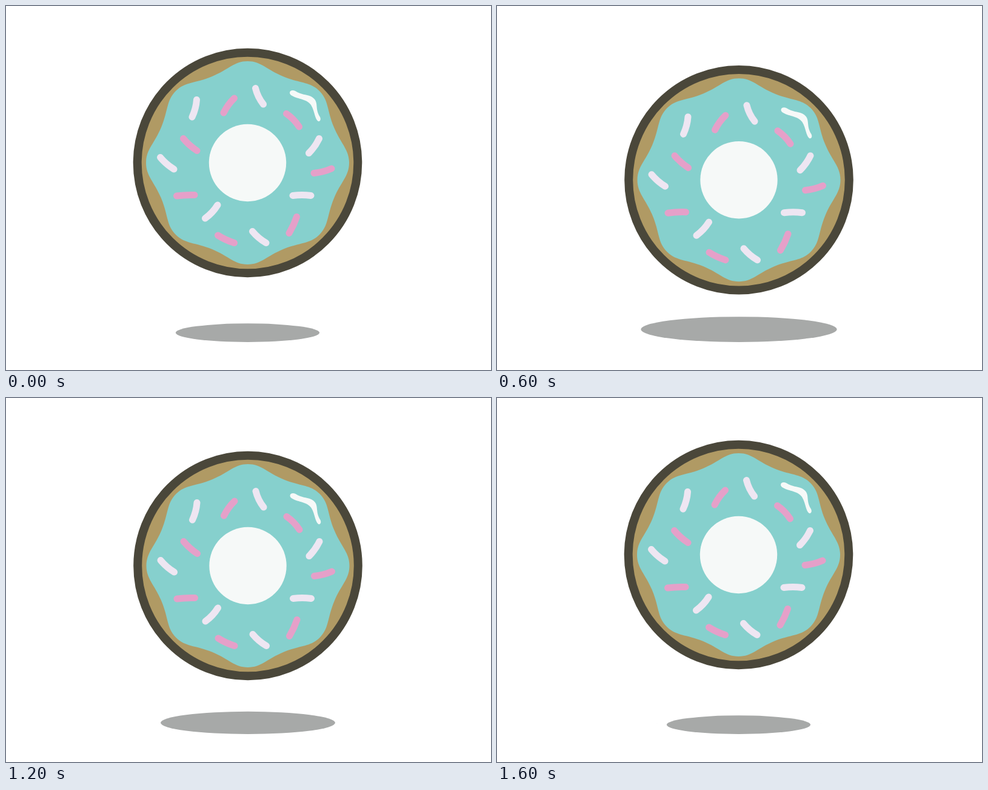
These frames come from a looping animation (800 by 600 pixels, 1.7 s). An HTML page:

```html
<!DOCTYPE html>
<html lang="en">
<head>
<meta charset="utf-8">
<title>Bouncing donut</title>
<style>
  html, body { margin: 0; width: 100%; height: 100%; overflow: hidden; background: #fff; }
  svg { display: block; width: 100%; height: 100%; }
</style>
</head>
<body>
<svg viewBox="0 0 800 600">
  <ellipse id="shadow" fill="#a7a9a8"/>
  <g id="donut">
    <circle cx="398.5" cy="258.5" r="181.8" fill="#b09a64" stroke="#4a473a" stroke-width="14"/>
    <path id="icing" transform="translate(398.5 258.5)" fill="#86d0cd"/>
    <circle cx="398.5" cy="258.5" r="63.7" fill="#f6f9f8"/>
    <g fill="none" stroke-width="11" stroke-linecap="round">
      <path stroke="#eee6f2" d="M314.5 154.5Q313.5 169 307 183M411.5 135.5Q415 150 424.5 162
        M516.5 218.5Q510 232 499.5 242.5M254.5 249.5Q264 261 277 269M473 312.5Q488 310.5 503 312.5
        M349 328Q341 341 328.5 350M406.5 371.5Q416 383 429 390.5"/>
      <path stroke="#e5a0c9" d="M376.5 152Q366 162 359 176M462.5 177.5Q475 186 483.5 199
        M292.5 218.5Q302 230 315 238.5M537 268Q523 274 508 275.5M281.5 313Q296 311 311 311.5
        M349.5 378Q362 386 376.5 390.5M479.5 347.5Q475 361 467 374.5"/>
    </g>
    <path fill="#f6f9f8" d="M468 143C468 139 473 138 477 140C488 147 494 145 503 149C518 157 508 168 518 183
      C520 187 518 191 515 190C509 186 509 172 503 163C496 153 482 154 472 148Q468 146 468 143Z"/>
  </g>
</svg>
<script>
const STEP = 100, STEPS = 17, BOTTOM = 8;
// [step, x shift, y shift, shadow half-width] on the way down
const poses = [[0, 0, 0, 118.6], [3, 0.5, 12, 135], [4, 0.5, 18, 143.9], [6, 0.5, 28.2, 161.7], [8, 3.5, 40.2, 170]];
const donut = document.getElementById('donut');
const shadow = document.getElementById('shadow');

function icingPath() {
  const point = (x, y, angle) => {
    const c = Math.cos(angle), s = Math.sin(angle);
    return `${(x * c - y * s).toFixed(2)} ${(x * s + y * c).toFixed(2)} `;
  };
  const lobe = 167.5, valley = 154, eighth = Math.PI / 4;
  let d = 'M' + point(0, -lobe, 0);
  for (let i = 0; i < 8; i++) {
    const tip = i * eighth, dip = tip + eighth / 2, next = tip + eighth;
    d += 'C' + point(22, -lobe, tip) + point(-30, -valley, dip) + point(0, -valley, dip);
    d += 'C' + point(30, -valley, dip) + point(-22, -lobe, next) + point(0, -lobe, next);
  }
  return d + 'Z';
}

function poseAt(depth) {
  const i = Math.max(1, poses.findIndex(p => p[0] >= depth));
  const a = poses[i - 1], b = poses[i];
  const k = (depth - a[0]) / (b[0] - a[0]);
  return a.map((v, j) => v + (b[j] - v) * k);
}

function draw(now) {
  const step = Math.floor(now / STEP) % STEPS;
  const [, x, y, rx] = poseAt(BOTTOM - Math.abs(BOTTOM - step));
  const ry = rx * 0.129;
  donut.setAttribute('transform', `translate(${x} ${y})`);
  shadow.setAttribute('cx', 398.5 + x);
  shadow.setAttribute('cy', 553.9 - ry);
  shadow.setAttribute('rx', rx);
  shadow.setAttribute('ry', ry);
}

document.getElementById('icing').setAttribute('d', icingPath());
const start = performance.now();
function tick() {
  draw(performance.now() - start);
  requestAnimationFrame(tick);
}
tick();
</script>
</body>
</html>
```
